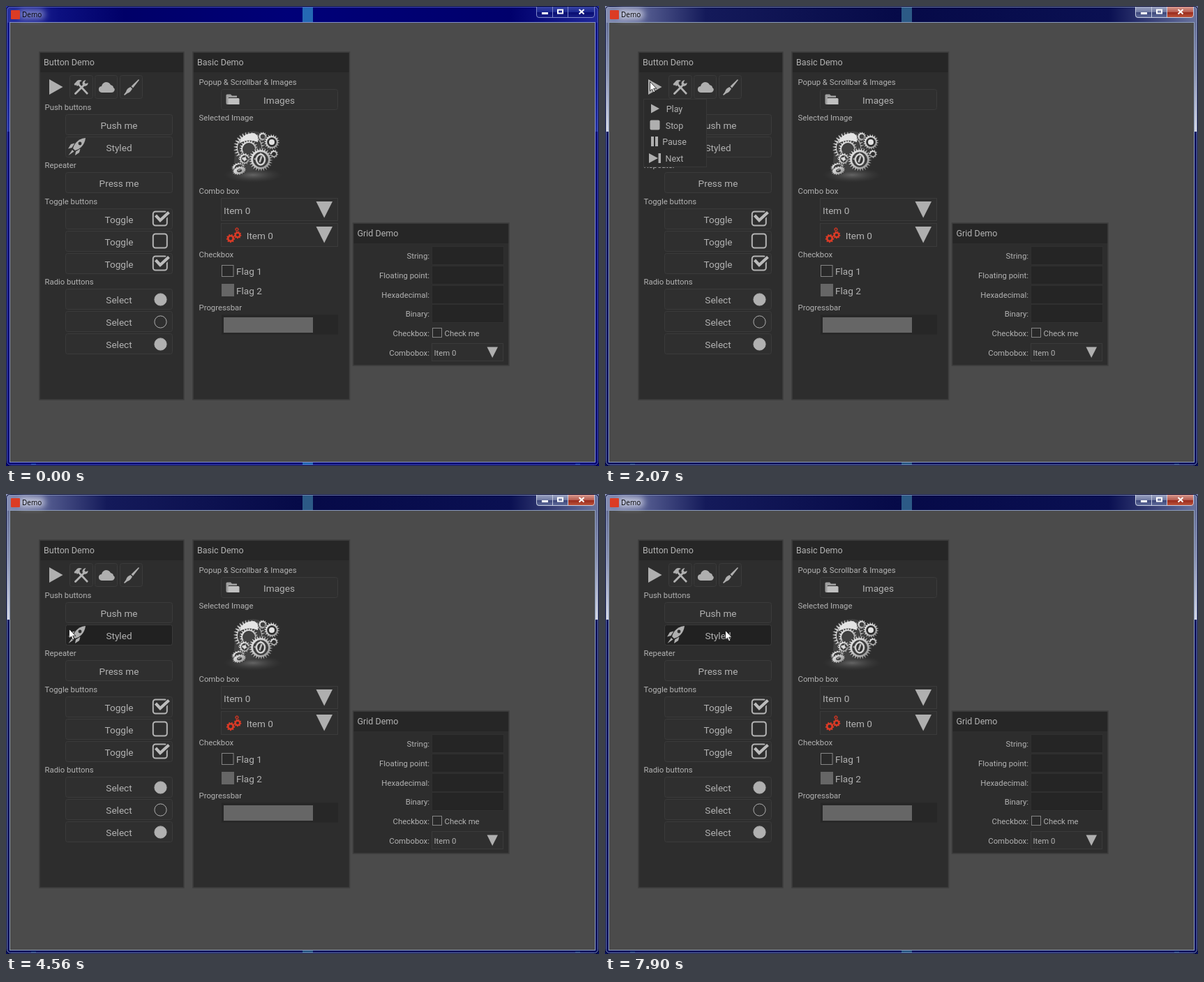
An HTML page for the animation above (8 s loop, 850 px wide and 659 px high).

```html
<!DOCTYPE html>
<html lang="en">
<head>
<meta charset="utf-8">
<title>Demo</title>
<style>
html, body { margin: 0; width: 100%; height: 100%; overflow: hidden; background: #4b4b4b; }
svg { display: block; width: 850px; height: 659px; }
text { font-family: Roboto, sans-serif; fill: #b2b2b2; }
.big { font-size: 13.6px; }
.head { font-size: 12.5px; }
.small { font-size: 11.35px; }
.mid { text-anchor: middle; }
.end { text-anchor: end; }
.title { font: 10px "Open Sans", sans-serif; fill: #000; }
.btn { fill: #2f2f2f; stroke: #3b3b3b; }
.btn.hot { fill: #212121; }
.field { fill: #252525; stroke: #303030; }
.icon { fill: #afafaf; }
.line { fill: none; stroke: #b4b4b4; stroke-width: 2; }
</style>
</head>
<body>
<svg id="stage" viewBox="0 0 850 659" xmlns="http://www.w3.org/2000/svg"></svg>
<script>
const LOOP = 8000, START = 290, STEP = 77.6;
const ACTIVE_AT = 22;
const POPUPS = [[23, 33], [39, 55]];

// Pointer path: step, x, y
const PATH = [
  [0, 711, 647], [3, 490, 508], [6, 290, 382], [8, 190, 325], [10, 136, 299],
  [13, 85, 204], [15, 61, 152], [17, 57, 135], [19, 61, 117], [21, 64, 108],
  [25, 64, 108], [30, 101, 142], [35, 101, 142], [38, 76, 124], [39, 75, 122],
  [40, 75, 122], [41, 75, 143], [47, 90, 193], [55, 90, 193], [62, 110, 118],
  [68, 110, 118], [72, 139, 117], [77, 139, 117], [78, 180, 117], [79, 191, 117],
  [83, 191, 117], [84, 184, 140], [86, 171, 187], [88, 171, 187], [90, 172, 171],
  [95, 172, 171], [98, 172, 195]
];

const buttons = [];
const rect = (x, y, w, h, attrs) =>
  `<rect x="${x}" y="${y}" width="${w}" height="${h}" ${attrs}/>`;
const text = (x, y, s, cls) =>
  `<text x="${x}" y="${y}" class="${cls}">${s.replace(/&/g, '&amp;')}</text>`;
const path = (d, attrs = 'class="icon"') => `<path d="${d}" ${attrs}/>`;

function button(x, y, w, h, label = '', cx = 162) {
  buttons.push([x, y, w, h]);
  return rect(x + .5, y + .5, w - 1, h - 1, 'rx="3" class="btn"') +
    (label && text(cx, y + 21, label, 'big mid'));
}

function panel(x, y, w, h, name) {
  return rect(x, y, w, h, 'fill="#2d2d2d"') +
    rect(x, y, w, 29, 'fill="#262626"') +
    rect(x, y, w, h, 'fill="none" stroke="#3e3e3e" stroke-width="1.6"') +
    text(x + 6, y + 19, name, 'head');
}

function gear(x, y, r, teeth, fill, hole = .4, attrs = '') {
  const n = teeth * 4;
  let d = '';
  for (let i = 0; i < n; i++) {
    const a = (i + .5) / n * Math.PI * 2, q = i % 4 < 2 ? r : r * .8;
    d += (i ? 'L' : 'M') + (x + q * Math.cos(a)).toFixed(1) + ' ' + (y + q * Math.sin(a)).toFixed(1);
  }
  const c = r * hole;
  d += `ZM${x - c} ${y}a${c} ${c} 0 1 0 ${2 * c} 0a${c} ${c} 0 1 0 ${-2 * c} 0Z`;
  return path(d, `fill="${fill}" fill-rule="evenodd" ${attrs}`);
}

function gradient(id, x2, y2, stops) {
  return `<linearGradient id="${id}" gradientUnits="userSpaceOnUse" x1="0" y1="0" x2="${x2}" y2="${y2}">` +
    stops.map(([o, c]) => `<stop offset="${o}" stop-color="${c}"/>`).join('') + '</linearGradient>';
}

function defs() {
  return '<defs>' +
    gradient('barOff', 850, 0, [[0, '#2a32a0'], [.09, '#0c1080'], [.2, '#000068'], [.48, '#000078'], [.85, '#00006c'], [1, '#20289a']]) +
    gradient('barOn', 850, 0, [[0, '#8890b4'], [.07, '#525a8e'], [.17, '#141a5a'], [.5, '#060a48'], [.85, '#0a1052'], [1, '#6a749e']]) +
    gradient('sideOff', 0, 180, [[0, '#101484'], [.6, '#141c94'], [1, '#2432a4']]) +
    gradient('sideOn', 0, 180, [[0, '#5a648e'], [.5, '#8a92b2'], [1, '#d4d8e6']]) +
    gradient('keyOff', 0, 17, [[0, '#3c48a8'], [.5, '#1c2890'], [.52, '#080c70'], [1, '#18208a']]) +
    gradient('keyOn', 0, 17, [[0, '#a4acc8'], [.5, '#707aa2'], [.52, '#3a4478'], [1, '#626e9c']]) +
    gradient('closeOn', 0, 17, [[0, '#dca49a'], [.5, '#b85c50'], [.52, '#98281a'], [1, '#c0583e']]) +
    '<linearGradient id="metal" x1="0" y1="0" x2="1" y2="1"><stop stop-color="#fafafa"/>' +
    '<stop offset=".5" stop-color="#c0c0c0"/><stop offset="1" stop-color="#7c7c7c"/></linearGradient>' +
    '<radialGradient id="shade"><stop stop-color="#777" stop-opacity=".75"/><stop offset="1" stop-color="#444" stop-opacity="0"/></radialGradient>' +
    '<filter id="blur" x="-50%" y="-100%" width="200%" height="300%"><feGaussianBlur stdDeviation="5"/></filter></defs>';
}

function chrome(on) {
  const s = on ? 'On' : 'Off';
  const low = on ? '#081060' : '#000078';
  const beam = on ? '#2c5a86' : '#2468b4';
  const key = on ? '#c6cce0' : '#8088c8';
  const frame = 'M0 0H850V659H0ZM6 24V653H844V24Z';
  return path(frame, `fill="${low}" fill-rule="evenodd"`) +
    rect(0, 0, 850, 24, `fill="url(#bar${s})"`) +
    [0, 844].map(x => rect(x, 24, 6, 156, `fill="url(#side${s})"`)).join('') +
    rect(425, 0, 15, 24, `fill="${beam}"`) + rect(425, 653, 15, 6, `fill="${beam}"`) +
    [36, 816].map(x => rect(x, 655, 7, 3, `fill="${beam}" opacity=".5"`)).join('') +
    rect(.5, .5, 849, 658, 'rx="5" fill="none" stroke="#05082c"') +
    rect(1.5, 1.5, 847, 656, `rx="5" fill="none" stroke="${on ? '#8492b8' : '#5c68c0'}" opacity=".9"`) +
    rect(5.5, 23.5, 839, 630, `fill="none" stroke="${on ? '#8c9cba' : '#8490c8'}"`) +
    rect(18, 5, 38, 14, `rx="6" fill="${on ? '#e2e4f0' : '#969ed4'}" opacity=".75" filter="url(#blur)"`) +
    rect(7, 6, 13, 13, 'rx="1" fill="#dc3c24"') +
    text(23, 16, 'Demo', 'title') +
    path('M760 1H844V13Q844 17 840 17H764Q760 17 760 13Z', `fill="url(#key${s})"`) +
    (on ? path('M806 1H844V13Q844 17 840 17H806Z', 'fill="url(#closeOn)"') : '') +
    path('M760.5 1V13Q760.5 16.5 764 16.5H840Q843.5 16.5 843.5 13V1M783.5 1V16M805.5 1V16', `fill="none" stroke="${key}"`) +
    rect(768, 9, 9, 3, 'fill="#fff"') +
    rect(791, 5.5, 7, 5, 'fill="none" stroke="#fff" stroke-width="2"') +
    path('M821.5 5L828.5 11.5M828.5 5L821.5 11.5', 'stroke="#fff" stroke-width="2"');
}

function toolIcons() {
  return path('M62 105L81.5 116L62 127Z') +
    button(91, 99, 34, 34) + button(127, 99, 33, 34) + button(163, 99, 33, 34) +
    path('M103 111L117 126', 'stroke="#b4b4b4" stroke-width="2.6"') +
    path('M97.5 112L102 107Q105 105 109 107L105.5 109L106 111L102 115L100.5 113L99 114Z') +
    path('M99.5 125.5L112 113', 'stroke="#b4b4b4" stroke-width="2.8" stroke-linecap="round"') +
    path('M109.5 112Q109 107 114.5 106L112.5 109.5L114 111.5L117.5 110Q118 114 113 115Z') +
    path('M137 124Q132 123 133 118Q134 115 137 115Q138 110 143 109Q148 109 150 113Q154 114 154 117Q157 119 155 122Q154 124 151 124Z') +
    path('M190 105L191 106L182 117.5L179.5 115Z') +
    path('M178.5 116L181 118.5Q178 124 174 125L170 128L169 127L172 123Q173 118 178.5 116Z');
}

function rocket() {
  return path('M114 189Q105 190 100 196Q97 200 96 204L99 207Q104 206 108 202Q113 197 114 189Z') +
    path('M98.5 196.5L93 198L89 204.5L94.5 203Z') +
    path('M106.5 204.5L105 210L99 214L100 208.5Z') +
    path('M95 206L97.5 208.5L89.5 214Z') +
    '<circle cx="106" cy="197" r="2.4" fill="#2f2f2f"/>';
}

function toggle(y, checked) {
  return button(85, y, 154, 30, 'Toggle') +
    rect(210.8, y + 4.5, 20, 20, 'rx="3.5" class="line"') +
    (checked ? path(`M214 ${y + 11}L221 ${y + 18}L234 ${y + 5}`, 'fill="none" stroke="#2f2f2f" stroke-width="7"') +
      path(`M214.5 ${y + 10}L221 ${y + 17}L233.5 ${y + 5.5}`, 'fill="none" stroke="#bcbcbc" stroke-width="4.2"') : '');
}

function radio(y, filled) {
  return button(85, y, 154, 30, 'Select') +
    `<circle cx="221.5" cy="${y + 15.5}" r="8.6" fill="${filled ? '#b0b0b0' : 'none'}" stroke="#b0b0b0"/>`;
}

function buttonPanel() {
  return panel(48, 66, 207, 498, 'Button Demo') + toolIcons() +
    text(55.5, 149, 'Push buttons', 'small') +
    button(85, 155, 154, 30, 'Push me') + button(85, 187, 154, 30, 'Styled') + rocket() +
    text(55.5, 232, 'Repeater', 'small') + button(85, 238, 154, 30, 'Press me') +
    text(55.5, 284, 'Toggle buttons', 'small') +
    toggle(290, true) + toggle(322, false) + toggle(354, true) +
    text(55.5, 399, 'Radio buttons', 'small') +
    radio(405, true) + radio(437, false) + radio(469, true);
}

function gearPicture() {
  const edge = 'stroke="#2a2a2a" stroke-width=".8"';
  const parts = [
    [349, 203, 23, 30, .72], [348, 205, 14, 20, .6], [368, 187, 7, 12, .4], [384, 212, 6.5, 10, .4],
    [381, 195, 11.5, 18, .55], [342, 219, 9, 13, .5], [365, 220, 17.5, 26, .6]
  ];
  return '<ellipse cx="354" cy="242" rx="42" ry="11" fill="url(#shade)"/>' +
    path('M328 212Q325 190 341 182Q360 175 371 186L378 205L372 232L345 238L326 234Z', 'fill="#424242"') +
    parts.slice(0, 2).map(p => gear(p[0], p[1], p[2], p[3], 'url(#metal)', p[4], edge)).join('') +
    path('M334 197Q339 182 355 182Q364 185 361 195Q347 189 334 197Z', 'fill="#e4e4e4"') +
    `<g transform="rotate(-14 334 233) translate(0 93) scale(1 .6)">${gear(334, 229, 11, 16, 'url(#metal)', .45, edge)}` +
    `${gear(334, 238, 11, 16, 'url(#metal)', .3, edge)}</g>` +
    parts.slice(2).map(p => gear(p[0], p[1], p[2], p[3], 'url(#metal)', p[4], edge)).join('') +
    '<ellipse cx="365" cy="220" rx="6" ry="7.5" fill="#333" stroke="#d4d4d4" stroke-width="2.4"/>' +
    path('M363.5 224L366.5 215', 'stroke="#bbb" stroke-width="2.6"') +
    '<circle cx="381" cy="195" r="4" fill="#e2e2e2"/><circle cx="342" cy="219" r="2.5" fill="#ddd"/>';
}

function basicPanel() {
  return panel(268, 66, 224.5, 498, 'Basic Demo') +
    text(276.5, 113, 'Popup & Scrollbar & Images', 'small') +
    button(308, 119, 168, 30, 'Images', 391.5) +
    path('M315.5 128Q315.5 126.5 317 126.5H322L324 128.5H331V131H319V141H317Q315.5 141 315.5 139Z', 'fill="#a0a0a0"') +
    path('M319.5 132H333Q334.5 132 334.5 133.5V141H318.5V133Z', 'fill="#c0c0c0"') +
    text(276.5, 164, 'Selected Image', 'small') + gearPicture() +
    text(276.5, 269, 'Combo box', 'small') +
    rect(308.5, 275.5, 167, 32, 'class="btn"') + text(312, 298, 'Item 0', 'big') +
    path('M444.5 280H468L456.2 303.5Z') +
    rect(308.5, 311.5, 167, 33, 'class="btn"') + text(344.7, 334, 'Item 0', 'big') +
    path('M444.5 316H468L456.2 339.5Z') +
    gear(322, 333, 6.3, 9, '#d83a26', .38) + gear(332, 328, 5.5, 9, '#d83a26', .38) +
    gear(331, 320, 3, 7, '#b83424', .35) +
    text(276.5, 360, 'Checkbox', 'small') +
    rect(309.5, 371.5, 16.5, 16, 'fill="#292929" stroke="#858585"') + text(330, 385, 'Flag 1', 'big') +
    rect(309, 398, 18, 18, 'fill="#666"') + text(330, 413, 'Flag 2', 'big') +
    text(276.5, 436, 'Progressbar', 'small') +
    rect(309, 442.5, 167, 28, 'fill="#272727"') + rect(312, 446, 128, 22, 'fill="#666"');
}

function gridPanel() {
  const rows = ['String:', 'Floating point:', 'Hexadecimal:', 'Binary:', 'Checkbox:', 'Combobox:'];
  return panel(497.5, 311, 223.5, 204, 'Grid Demo') +
    rows.map((s, i) => {
      const dy = Math.round(i * 27.8);
      return text(607, 362 + dy, s, 'small end') +
        (i < 4 ? rect(610.5, 344.5 + dy, 103, 26, 'class="field"') : '');
    }).join('') +
    rect(611.5, 461.5, 13, 13, 'fill="#292929" stroke="#858585"') + text(628.5, 473, 'Check me', 'small') +
    rect(610.5, 483.5, 102, 25, 'class="btn"') + text(613.5, 501, 'Item 0', 'small') +
    path('M689.5 488.5H705L697.2 504Z');
}

function popup() {
  return '<g id="popup">' + rect(55.5, 133.5, 90, 97, 'fill="#2b2b2b" stroke="#383838"') +
    ['Play', 'Stop', 'Pause', 'Next'].map((s, i) => text(99.5, 151.5 + Math.round(i * 23.7), s, 'head mid')).join('') +
    path('M66 140.5L78 147L66 153.5Z') + rect(64.5, 163.5, 14, 14, 'rx="2" class="icon"') +
    path('M66 187H70V201H66ZM72 187H76V201H72Z') +
    path('M63 211L76 218L63 225ZM76.5 211H80V225H76.5Z') + '</g>';
}

const stage = document.getElementById('stage');
stage.innerHTML = defs() + rect(0, 0, 850, 659, 'fill="#4b4b4b"') +
  `<g id="off">${chrome(false)}</g><g id="on">${chrome(true)}</g>` +
  buttonPanel() + basicPanel() + gridPanel() + popup() +
  '<g id="pointer">' + path('M.5 .5V13.8L3.5 11L5.6 15.8L7.8 14.8L5.7 10.2H9.8Z',
    'fill="#fff" stroke="#111" stroke-width=".8"') + '</g>';

const [off, on, menu, pointer] = ['off', 'on', 'popup', 'pointer'].map(id => document.getElementById(id));
const faces = [...stage.querySelectorAll('rect[rx="3"].btn')];
const show = (el, yes) => { el.style.display = yes ? '' : 'none'; };

function pointerAt(k) {
  const i = PATH.findIndex(p => p[0] >= k);
  if (i < 0) return PATH[PATH.length - 1].slice(1);
  const b = PATH[i], a = PATH[i - 1] || b;
  const f = b === a ? 0 : (k - a[0]) / (b[0] - a[0]);
  return [1, 2].map(j => Math.round(a[j] + (b[j] - a[j]) * f));
}

function draw(now) {
  const time = now % LOOP;
  const k = Math.floor((time - START + 25) / STEP);
  const active = k >= ACTIVE_AT;
  const open = POPUPS.some(([a, b]) => k >= a && k < b);
  show(off, !active);
  show(on, active);
  show(menu, open);
  show(pointer, time >= START);
  const [x, y] = pointerAt(k);
  pointer.setAttribute('transform', `translate(${x} ${y})`);
  // The highlight trails the pointer by one step.
  const [hx, hy] = pointerAt(k - 1);
  buttons.forEach(([bx, by, w, h], i) => faces[i].classList.toggle('hot',
    active && !open && hx >= bx && hx < bx + w && hy >= by && hy < by + h));
  requestAnimationFrame(() => draw(performance.now()));
}
draw(performance.now());
</script>
</body>
</html>
```
